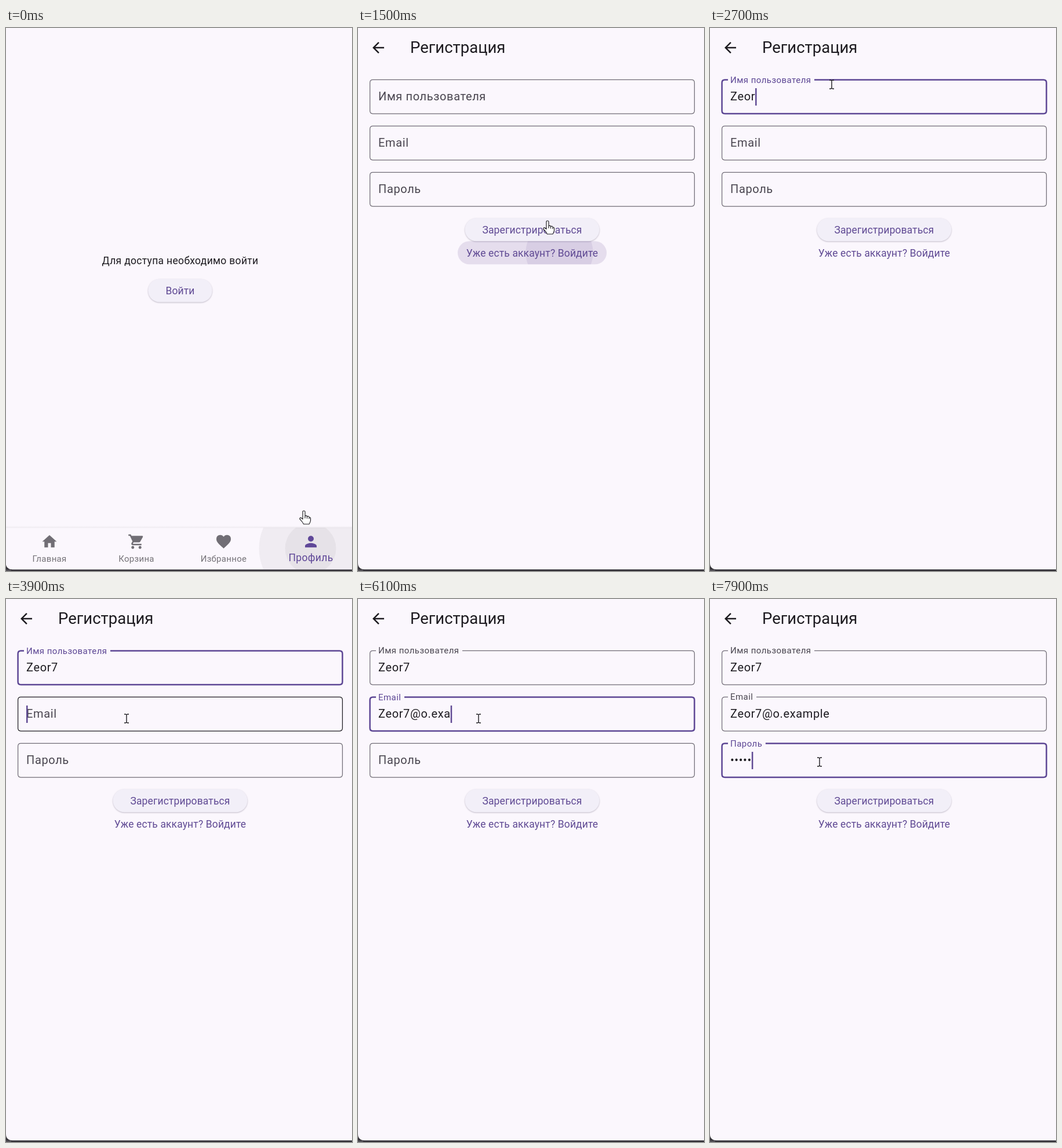
An HTML page for the animation above (8000 ms loop, 597 px wide and 938 px high).

```html
<!DOCTYPE html>
<html lang="ru">
<head>
<meta charset="utf-8">
<title>Регистрация</title>
<style>
  html, body { margin: 0; width: 100%; height: 100%; overflow: hidden; background: #fbf7fd; }
  svg { display: block; width: 597px; height: 938px; font-family: Roboto, "Noto Sans", sans-serif; cursor: default; }
  text { white-space: pre; fill: #1d1b20; }
  .title { font-size: 27.5px; }
  .body { font-size: 17.5px; letter-spacing: .3125px; text-anchor: middle; }
  .action { font-size: 17.5px; letter-spacing: .125px; text-anchor: middle; fill: #604a94; }
  .input { font-size: 20px; letter-spacing: .625px; }
  .tab { font-size: 15px; letter-spacing: .3125px; text-anchor: middle; fill: #757278; }
  .tab.on { font-size: 17.5px; fill: #5f4798; }
  .raised { fill: #f2eff8; filter: drop-shadow(0 1.2px .9px rgba(40, 30, 60, .28)); }
  .tint, .splash { fill: #604a94; }
  .page { transform-origin: 298.5px 469px; }
</style>
</head>
<body>
<svg id="stage" viewBox="0 0 597 938"></svg>
<script>
const LOOP = 8000, STEP = 100;
const INK = [29, 27, 32], PRIMARY = [92, 70, 148], OUTLINE = [112, 108, 118], LABEL = [73, 69, 79];
const stage = document.getElementById('stage');

const clamp = v => Math.max(0, Math.min(1, v));
const span = (t, from, to) => clamp((t - from) / (to - from));
const ease = v => 1 - Math.pow(1 - v, 3);
const smooth = v => v * v * (3 - 2 * v);
const lerp = (a, b, k) => a + (b - a) * k;
const mix = (a, b, k) => `rgb(${a.map((v, i) => Math.round(lerp(v, b[i], k)))})`;
const within = (t, ranges) => ranges.some(([a, b]) => t >= a && t < b);
const set = (el, attrs) => { for (const k in attrs) el.setAttribute(k, attrs[k]); };

const ICONS = {
  home: 'M10 20v-6h4v6h5v-8h3L12 3 2 12h3v8z',
  cart: 'M1 2v2h2l3.6 7.6-1.35 2.45C4.5 15.4 5.5 17 7 17h12v-2H7.4q-.4-.1-.2-.4l.9-1.6h7.45q1.2 0 1.75-1l3.6-6.5Q21.5 4 20 4H5.2l-.95-2zM7 18a2 2 0 1 0 .01 0zM17 18a2 2 0 1 0 .01 0z',
  heart: 'M12 21.35l-1.45-1.32C5.4 15.36 2 12.28 2 8.5A5.5 5.5 0 0 1 12 5.1 5.5 5.5 0 0 1 22 8.5c0 3.78-3.4 6.86-8.55 11.54z',
  person: 'M12 12a4 4 0 1 0 0-8 4 4 0 0 0 0 8zm0 2c-2.67 0-8 1.34-8 4v2h16v-2c0-2.66-5.33-4-8-4z',
  back: 'M20 11H7.83l5.59-5.59L12 4l-8 8 8 8 1.41-1.41L7.83 13H20z'
};
const POINTERS = {
  arrow: 'M0 0V16.5L4 13 7 19.3 9.6 18.2 7 12H11.7Z',
  hand: 'M-2 2Q-2 0 0 0T2 2V9Q4.5 7.5 5.5 9.7 8.5 8.7 9 11 11.5 11 11.5 13V17Q11 20 9 23H-.5Q-3 18-7 14.5-7.5 11.5-5 12L-2 14.5ZM2 8V13M5.5 10V13.5M9 11V14',
  beam: 'M-4-7.5H-1.5L0-6.7 1.5-7.5H4M0-6.7V6.7M-4 7.5H-1.5L0 6.7 1.5 7.5H4'
};

const icon = (name, x, y, fill) =>
  `<path d="${ICONS[name]}" transform="translate(${x} ${y}) scale(1.25)" fill="${fill}"/>`;

const tab = (name, label, x, on) =>
  icon(name, x - 15, 872.3, on ? '#5f4798' : '#716e75') +
  `<text class="tab${on ? ' on' : ''}" x="${x}" y="${on ? 921 : 922}">${label}</text>`;

function pill(id, y, w, label, raised) {
  const box = `x="${300.5 - w / 2}" y="${y}" width="${w}" height="40" rx="20"`;
  return `<g id="${id}">
    <clipPath id="${id}Clip"><rect ${box}/></clipPath>
    ${raised ? `<rect class="raised" ${box}/>` : ''}
    <rect class="tint" ${box} opacity="0"/>
    <g clip-path="url(#${id}Clip)"><circle class="splash" opacity="0"/></g>
    <text class="action" x="300.5" y="${y + 26.3}">${label}</text></g>`;
}

const field = (id, label) => `<g id="${id}">
  <path class="frame" fill="none"/>
  <text class="label input">${label}</text>
  <text class="value input" x="35"></text>
  <rect class="caret" width="2.5" height="30" fill="#604a94" opacity="0"/></g>`;

const page = (id, content) => `<g id="${id}" class="page">
  <rect width="597" height="938" fill="#fbf7fd"/>${content}</g>`;

const bar = title => icon('back', 20, 19, '#1d1b20') + `<text class="title" x="90" y="43">${title}</text>`;

stage.innerHTML = `
  <defs>
    <clipPath id="window"><path d="M0 0H597V935.3H11Q0 935 0 924Z"/></clipPath>
    <clipPath id="navClip"><rect y="863" width="597" height="75"/></clipPath>
    <linearGradient id="navShade" x2="0" y2="1">
      <stop offset="0" stop-color="#000" stop-opacity="0"/><stop offset="1" stop-color="#000" stop-opacity=".06"/>
    </linearGradient>
  </defs>
  <rect width="597" height="938" fill="#343238"/>
  <path d="M0 936.5H9" stroke="#77757a"/>
  <g clip-path="url(#window)">
    ${page('home', `
      <text class="body" x="300.5" y="408">Для доступа необходимо войти</text>
      ${pill('enter', 433.5, 110.5, 'Войти', true)}
      <rect y="860" width="597" height="4" fill="url(#navShade)"/>
      <rect y="863.5" width="597" height="75" fill="#fbf7fd"/>
      <g id="navInk" clip-path="url(#navClip)">
        <circle cx="526" cy="899" r="89.5" opacity=".042"/>
        <circle cx="525.5" cy="899" r="44" opacity=".045"/>
      </g>
      ${tab('home', 'Главная', 75)}${tab('cart', 'Корзина', 225)}
      ${tab('heart', 'Избранное', 375.5)}${tab('person', 'Профиль', 526, true)}`)}
    ${page('login', bar('Вход') + field('loginMail', 'Email') + field('loginPass', 'Пароль') +
      pill('signIn', 268.3, 110.5, 'Войти', true) +
      pill('toJoin', 308.3, 312, 'Нет аккаунта? Зарегистрируйтесь'))}
    ${page('join', bar('Регистрация') + field('name', 'Имя пользователя') + field('mail', 'Email') +
      field('pass', 'Пароль') + pill('signUp', 328.3, 232, 'Зарегистрироваться', true) +
      pill('toLogin', 368.3, 257, 'Уже есть аккаунт? Войдите'))}
  </g>
  <path id="pointer" stroke-linejoin="round"/>`;

const $ = id => document.getElementById(id);

const FORM = [
  { id: 'name', y: 89, text: 'Zeor7', focus: [2000, 3900],
    keys: [2200, 2300, 2500, 2600, 3100], caret: [[2000, 2800], [3100, 3600]] },
  { id: 'mail', y: 169, text: 'Zeor7@o.example', focus: [3900, 7100],
    keys: [4300, 4500, 4600, 4800, 4900, 5400, 5700, 5800, 5900, 6000, 6100, 6300, 6500, 6500, 6600],
    caret: [[3900, 5200], [5400, 7000]] },
  { id: 'pass', y: 249, text: '•••••', focus: [7100, 8100],
    keys: [7400, 7500, 7600, 7700, 7800], caret: [[7100, 8000]] }
];

// time, x, y of the pointer tip
const ROUTE = [
  [0, 514, 834], [100, 500, 790], [400, 327, 453], [600, 327, 452], [900, 329, 451], [1200, 328, 337],
  [1500, 327, 333], [1900, 215, 118], [2300, 211, 110], [2600, 210, 97.5], [3500, 210, 97.5],
  [3800, 208, 206.5], [6500, 208, 206.5], [6900, 189, 279], [7400, 189, 281.5], [8000, 189, 281.5]
];

function pointerAt(t) {
  const i = ROUTE.findIndex(p => p[0] > t);
  const a = ROUTE[i - 1], b = ROUTE[i], k = smooth(span(t, a[0], b[0]));
  return [lerp(a[1], b[1], k), lerp(a[2], b[2], k)];
}

const inBox = ([x, y], x0, y0, w, h) => x >= x0 && x < x0 + w && y >= y0 && y < y0 + h;

function drawField(id, y, { float = 0, focus = 0, hover = 0, text = '', caret = 0 }) {
  const g = $(id), [frame, label, value, bar] = g.children;
  const l = 20.6, r = 580.5, top = y + .4, bottom = y + 59, c = 5;
  const gapStart = 31, gap = (label.getComputedTextLength() * .75 + 9.5) * float;
  const edge = focus ? mix(OUTLINE, PRIMARY, focus) : mix(OUTLINE, INK, hover);
  set(frame, {
    d: `M${gapStart + gap} ${top}H${r - c}q${c} 0 ${c} ${c}V${bottom - c}q0 ${c} ${-c} ${c}` +
       `H${l + c}q${-c} 0 ${-c} ${-c}V${top + c}q0 ${-c} ${c} ${-c}H${gapStart}`,
    stroke: edge, 'stroke-width': lerp(1.25, 2.5, focus)
  });
  const size = lerp(1, .75, float);
  const base = lerp(y + 36, y + 5.3 + .8 * focus, float);
  set(label, { transform: `translate(35 ${base}) scale(${size})`, fill: '' });
  label.style.fill = mix(LABEL, PRIMARY, focus);
  value.textContent = text;
  set(value, { y: y + 36 });
  set(bar, { x: 35 + (text ? value.getComputedTextLength() : 0), y: y + 15, opacity: caret });
}

function drawInk(id, tint, splash = 0, x = 0, y = 0, r = 0) {
  set($(id).querySelector('.tint'), { opacity: tint });
  set($(id).querySelector('.splash'), { opacity: splash, cx: x, cy: y, r });
}

function drawPointer(t, at) {
  const onJoin = t >= 1400, onLogin = t >= 600 && !onJoin;
  const fields = onJoin ? [89, 169, 249] : onLogin ? [109, 189] : [];
  let kind = 'arrow';
  if (fields.some(y => inBox(at, 20, y, 561, 60))) kind = 'beam';
  else if (t < 100 ||
    (onJoin && inBox(at, 184, 328, 233, 80)) ||
    (onLogin && inBox(at, 145, 268, 311, 80)) ||
    (!onJoin && !onLogin && inBox(at, 245, 433, 111, 41))) kind = 'hand';
  set($('pointer'), {
    d: POINTERS[kind], transform: `translate(${at})`,
    fill: kind === 'beam' ? 'none' : '#fff', stroke: '#1c1b1f', 'stroke-width': kind === 'beam' ? 1.4 : 1.15
  });
}

function render(t) {
  const at = pointerAt(t);
  const open = span(t, 500, 800), zoom = ease(open);
  $('home').style.display = t < 800 ? '' : 'none';
  $('home').style.transform = `scale(${lerp(1, 1.05, zoom)})`;
  $('login').style.display = t > 500 && t < 1400 ? '' : 'none';
  $('login').style.transform = `scale(${lerp(.85, 1, zoom)})`;
  $('login').style.opacity = span(open, .1, .3);
  $('join').style.display = t >= 1400 ? '' : 'none';
  set($('navInk'), { opacity: 1 - span(t, 0, 250) });

  drawInk('enter', inBox(at, 245, 433, 111, 41) ? .08 : 0, t >= 400 ? .12 : 0, 327, 453, lerp(15, 90, span(t, 400, 700)));
  if (t < 1400) {
    drawField('loginMail', 109, {});
    drawField('loginPass', 189, {});
    drawInk('signIn', 0);
    drawInk('toJoin', inBox(at, 145, 308, 311, 40) ? .08 : 0, t >= 1300 ? .1 : 0, 328, 337, 22);
  } else {
    const fade = 1 - span(t, 1500, 1800);
    drawInk('toLogin', .145 * fade, .1 * fade, 347.5, 388, lerp(40, 58, span(t, 1400, 1500)) + 140 * span(t, 1500, 1800));
    drawInk('signUp', inBox(at, 184, 328, 233, 40) && t > 1500 ? .08 : 0);
    for (const f of FORM) {
      const [from, to] = f.focus;
      const rise = smooth(span(t, from, from + 170));
      const text = f.text.slice(0, f.keys.filter(k => k <= t).length);
      const dim = f.id === 'name' && t >= 2800 && t < 2900 ? .4 : 0;
      drawField(f.id, f.y, {
        float: rise, text,
        focus: rise * (1 - span(t, to, to + 170)),
        hover: inBox(at, 20, f.y, 561, 60) ? 1 : 0,
        caret: within(t, f.caret) ? 1 : dim
      });
    }
  }
  drawPointer(t, at);
}

const start = performance.now();
function tick() {
  const t = (performance.now() - start) % LOOP;
  render(Math.floor(t / STEP) * STEP);
  requestAnimationFrame(tick);
}
tick();
</script>
</body>
</html>
```
